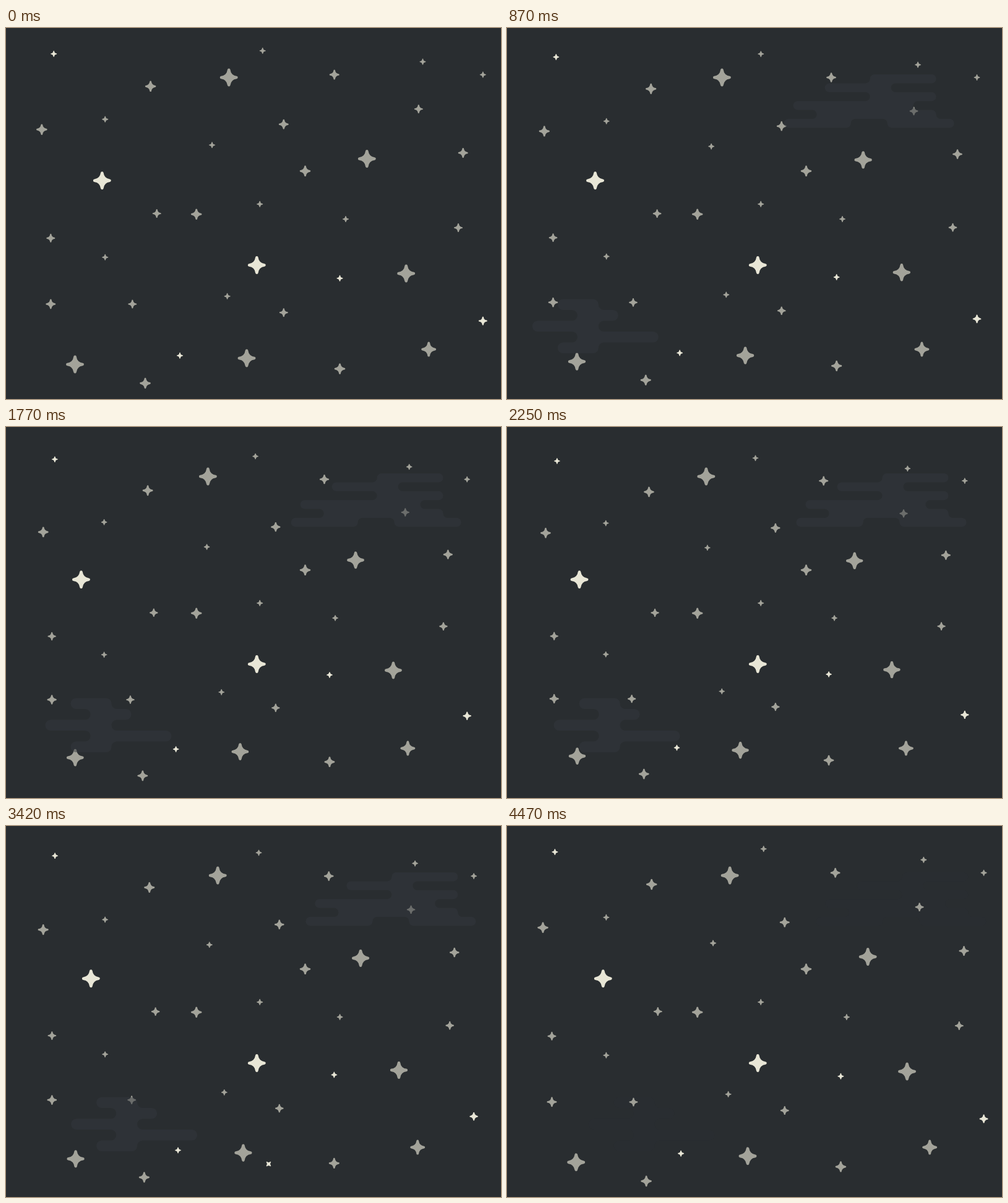
An HTML page with a canvas for the animation above (4500 ms loop, 800 px wide and 600 px high).

```html
<!DOCTYPE html>
<html lang="en">
<head>
<meta charset="utf-8">
<title>Night sky</title>
<style>
html, body { margin: 0; height: 100%; overflow: hidden; background: #292d30; }
canvas { display: block; }
</style>
</head>
<body>
<canvas id="sky" width="800" height="600"></canvas>
<script>
const ctx = document.getElementById('sky').getContext('2d');
const LOOP = 4500;
const BRIGHT = '#e8e6d6', DIM = '#a3a39a';

// Each layer maps a star's rest position to [x, y, scale]; p runs 0 -> 1 -> 0 over the loop.
const smooth = p => p * p * (3 - 2 * p);
const still = (x, y) => [x, y, 1];
const slide = (x, y, p) => [x - 38.3 * smooth(p), y, 1];
const shrink = (x, y, p) => {
  const k = 1 - 0.05 * p;
  return [411 + (x - 411) * k - 13 * smooth(p), 308 + (y - 308) * k, k];
};

const stars = [
  { move: still, r: 14.5, color: BRIGHT, at: [[405.3, 383.5]] },
  { move: still, r: 8.8, color: DIM, at: [[483.5, 231.3], [307.7, 301.2]] },
  { move: still, r: 5, color: DIM, at: [[410.2, 284.8]] },
  { move: slide, r: 14.5, color: BRIGHT, at: [[155.3, 246.7]] },
  { move: slide, r: 14.5, color: DIM, at: [[360.2, 80]] },
  { move: slide, r: 12, color: DIM, at: [[683.2, 519.6]] },
  { move: shrink, r: 14.5, color: DIM, at: [[583.3, 211.5], [646.7, 397], [111.5, 544], [389, 534]] },
  { move: shrink, r: 8.8, color: DIM, at: [[233.6, 94.3], [57.8, 164.2], [539.5, 551.2], [225, 574.5]] },
  { move: shrink, r: 8, color: DIM, at: [[530.7, 75.5], [448.8, 155.7], [738.7, 202], [72.3, 446.4]] },
  { move: shrink, r: 7, color: DIM, at: [[666.8, 131], [243.7, 300], [731, 323], [72.3, 339.8], [204.3, 446.5], [448.8, 460.2]] },
  { move: shrink, r: 7, color: BRIGHT, at: [[770.8, 473.7]] },
  { move: shrink, r: 5, color: DIM, at: [[414.7, 36.8], [673.5, 54.5], [770.8, 75.5], [160.2, 147.6], [333, 189.3], [549, 309], [160.2, 370.8], [357.6, 433.8]] },
  { move: shrink, r: 5, color: BRIGHT, at: [[77.2, 41.8], [539.5, 404.8], [281, 529.8]] }
];

// Clouds are stacks of equal rows; left and right hold the edge of each row.
const clouds = [
  { y: 75, row: 14.4, speed: 0.0144, gap: [609, 550], shift: -6.9,
    left: [581, 508, 581, 457, 495, 442], right: [688, 615, 688, 651, 688, 717] },
  { y: 438.5, row: 17.5, speed: 0.0252, shift: -12.1,
    left: [72, 104, 31, 104, 72], right: [138, 170, 138, 235, 138] }
];

function cloudPath({ y, row, left, right, gap }) {
  const edge = xs => xs.flatMap((x, i) => [[x, y + i * row], [x, y + (i + 1) * row]]);
  const bottom = y + left.length * row;
  const notch = gap
    ? [[gap[0], bottom], [gap[0], bottom - row], [gap[1], bottom - row], [gap[1], bottom]]
    : [];
  const pts = [...edge(right), ...notch, ...edge(left).reverse()];
  const path = new Path2D();
  path.moveTo((left[0] + right[0]) / 2, y);
  pts.forEach((pt, i) => path.arcTo(...pt, ...pts[(i + 1) % pts.length], row / 2 - 0.01));
  path.closePath();
  return path;
}
clouds.forEach(c => c.path = cloudPath(c));

// Unit star: concave sides, tips rounded by the stroke.
const starPath = new Path2D('M0-.84Q.1-.1 .84 0Q.1 .1 0 .84Q-.1 .1-.84 0Q-.1-.1 0-.84Z');

function drawStar(x, y, r, color, angle = 0) {
  ctx.save();
  ctx.translate(x, y);
  ctx.rotate(angle);
  ctx.scale(r, r);
  ctx.fillStyle = ctx.strokeStyle = color;
  ctx.lineWidth = 0.32;
  ctx.lineJoin = 'round';
  ctx.fill(starPath);
  ctx.stroke(starPath);
  ctx.restore();
}

function draw(now) {
  const t = now % LOOP;
  const p = 1 - Math.abs(1 - 2 * t / LOOP);
  ctx.fillStyle = '#292d30';
  ctx.fillRect(0, 0, 800, 600);

  for (const { move, r, color, at } of stars) {
    for (const [x0, y0] of at) {
      const [x, y, k] = move(x0, y0, p);
      drawStar(x, y, r * k, color);
    }
  }

  ctx.globalAlpha = 0.5 * Math.min(1, t / 480, (LOOP - t) / 480);
  ctx.fillStyle = '#35383e';
  for (const { path, speed, shift } of clouds) {
    ctx.save();
    ctx.translate(shift + speed * t, 0);
    ctx.fill(path);
    ctx.restore();
  }
  ctx.globalAlpha = 1;

  // Shooting star, crossing from the bottom edge to the right edge.
  if (t > 3240 && t < 4320) {
    const d = 0.44 * (t - 3420);
    drawStar(424 + d, 547 - d, 5, BRIGHT, Math.PI / 4);
  }
}

function frame() {
  draw(performance.now());
  requestAnimationFrame(frame);
}
frame();
</script>
</body>
</html>
```
